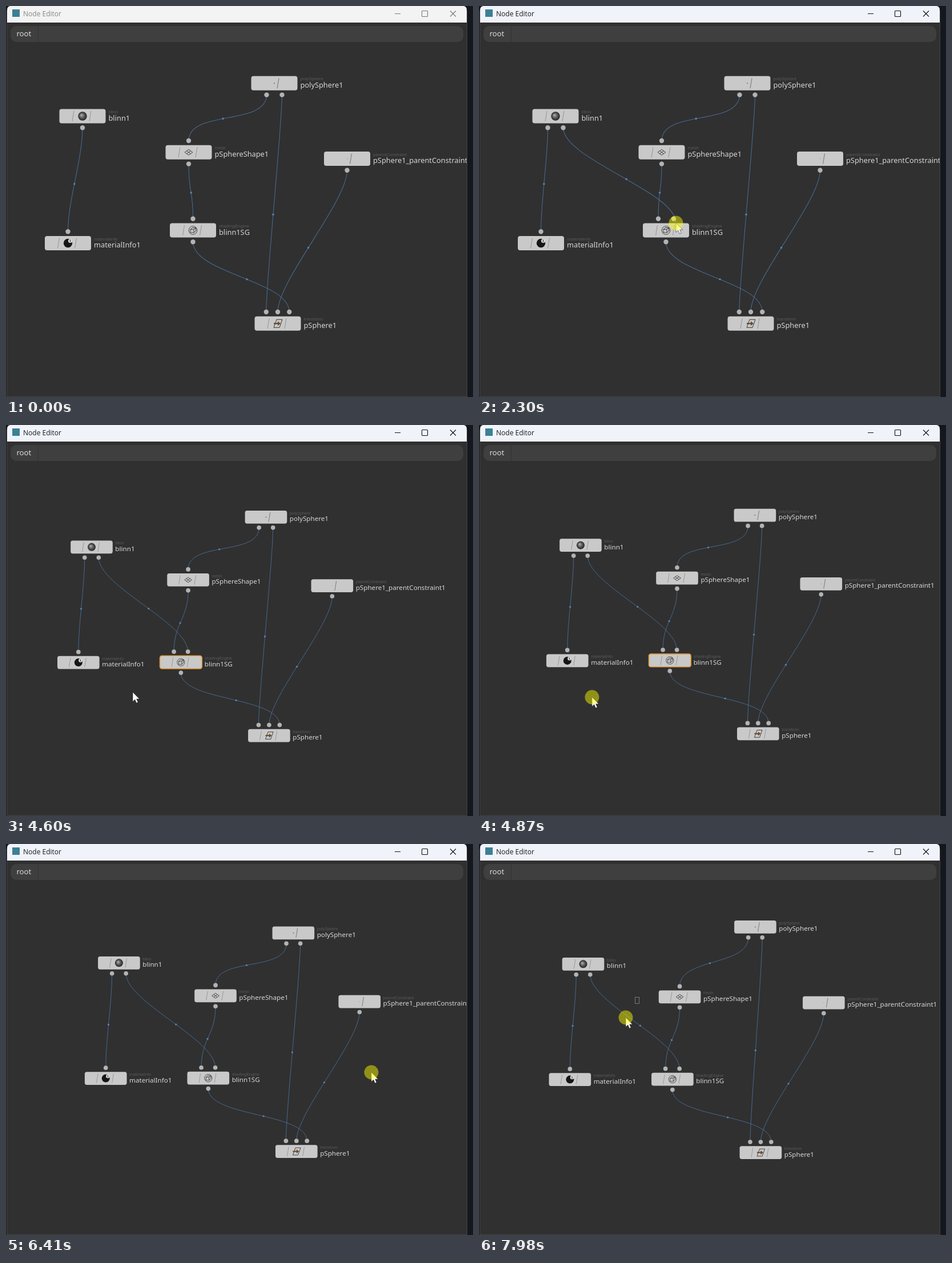
Write an HTML page with a canvas that moves like this. It is 818 by 685 pixels and loops after 8000 ms.

```html
<!DOCTYPE html>
<html>
<head>
<meta charset="utf-8">
<style>
html, body { margin: 0; width: 100%; height: 100%; overflow: hidden; background: #15171e; }
canvas { display: block; }
</style>
</head>
<body>
<canvas id="stage" width="818" height="685"></canvas>
<script>
const c = document.getElementById('stage').getContext('2d');
const LOOP = 8000, ZOOM = 0.909, LAG = 58, PORT = 20.3, PULL = 55;
const ORANGE = '#e39a35', BLUE = '#47698f';

const node = (name, type, x, y, ins, outs, icon) => ({ name, type, x0: x, y0: y, x, y, ins, outs, icon });
const poly = node('polySphere1', 'polySphere', 470, 135.3, 0, 2, slashIcon);
const blinn = node('blinn1', 'blinn', 134, 193, 0, 1, ballIcon);
const shape = node('pSphereShape1', 'mesh', 320, 256.3, 1, 1, meshIcon);
const cons = node('pSphere1_parentConstraint1', 'parentConstraint', 597.5, 267.5, 0, 1, slashIcon);
const sg = node('blinn1SG', 'shadingEngine', 327.5, 393, 1, 1, cubeIcon);
const info = node('materialInfo1', 'materialInfo', 108.5, 415.5, 1, 0, infoIcon);
const xform = node('pSphere1', 'transform', 476, 556.3, 3, 0, planeIcon);
const nodes = [poly, blinn, shape, cons, sg, info, xform];
const links = [
  [poly, 0, shape, 0], [poly, 1, xform, 0], [cons, 0, xform, 1], [sg, 0, xform, 2],
  [blinn, 0, info, 0], [shape, 0, sg, 0]
];

// Mouse stops: arrival time, x, y, rest
const stops = [
  [250, 458, 612, 0], [1200, 162, 215, 290], [2100, 345, 380, 700], [3100, 325, 500, 0],
  [3300, 322, 446, 70], [3550, 329.5, 403, 50], [4060, 310, 423, 300], [4600, 222, 468, 70],
  [4760, 170, 480, 0], [4960, 218, 474.5, 0], [5230, 89, 142, 0], [5580, 596, 463, 70],
  [5850, 725, 590, 200], [6400, 640, 400, 0], [6650, 624.5, 402, 0], [6960, 530, 238, 70],
  [7130, 492, 160, 0], [7320, 547, 175, 0], [7540, 488, 147.5, 0], [7780, 280, 268, 110],
  [7980, 257, 304, 20]
];
const drag = (what, from, to) => ({ what, from, to });
const drags = [
  drag('link', 1415, 2800), drag(sg, 3600, 4060), drag('pan', 4760, 4960), drag('area', 5230, 6040),
  drag('pan', 6400, 6650), drag(poly, 7130, 7540), drag('area', 7890, LOOP)
];

const within = (t, a, b) => t >= a && t < b;
const clamp = (v, a, b) => Math.max(a, Math.min(b, v));

function mouse(t) {
  const i = stops.findIndex(s => s[0] > t);
  if (i <= 0) return stops[i ? stops.length - 1 : 0].slice(1, 3);
  const [t0, x0, y0, rest] = stops[i - 1], [t1, x1, y1] = stops[i];
  let u = clamp((t - t0 - rest) / (t1 - t0 - rest), 0, 1);
  u *= u * (3 - 2 * u);
  return [x0 + (x1 - x0) * u, y0 + (y1 - y0) * u];
}

// Total distance something has been dragged by time t
function dragged(what, t) {
  let dx = 0, dy = 0;
  for (const d of drags.filter(d => d.what === what)) {
    const a = mouse(d.from), b = mouse(clamp(t, d.from, d.to));
    dx += b[0] - a[0];
    dy += b[1] - a[1];
  }
  return [dx, dy];
}

function path(points, close) {
  c.beginPath();
  points.forEach(([x, y]) => c.lineTo(x, y));
  if (close) c.closePath();
}
function stroke(color, width) {
  c.strokeStyle = color;
  c.lineWidth = width;
  c.stroke();
}
function line(color, width, ...points) {
  path(points);
  stroke(color, width);
}
function fill(color) {
  c.fillStyle = color;
  c.fill();
}
function disc(x, y, r, color) {
  c.beginPath();
  c.arc(x, y, r, 0, 7);
  fill(color);
}
function box(x, y, w, h, r, color) {
  c.beginPath();
  c.roundRect(x, y, w, h, r);
  fill(color);
}
function text(s, x, y, font, color) {
  c.font = font;
  c.fillStyle = color;
  c.fillText(s, x, y);
}

function dividers() {
  for (const x of [-15, 15]) line('#949494', 1, [x, -9], [x - 3, 9]);
}
function slashIcon(n) {
  line('#8a8a8a', 1.4, [8, -9], [5, 9]);
  disc(0, 0, 0.9, n === poly ? '#555' : '#aaa');
}
function ballIcon() {
  dividers();
  const g = c.createRadialGradient(-2, -2, 0.5, 0, 0, 7.7);
  g.addColorStop(0, '#aaa');
  g.addColorStop(0.5, '#5c5c5c');
  g.addColorStop(1, '#222');
  disc(0, 0, 7.7, g);
}
function meshIcon() {
  dividers();
  for (const i of [-1, 0, 1]) {
    for (const k of [-1, 1]) {
      line('#333', 0.9, [3.5 * (i - 1), 2.5 * k * (i + 1)], [3.5 * (i + 1), 2.5 * k * (i - 1)]);
    }
  }
}
function cubeIcon() {
  dividers();
  c.beginPath();
  c.arc(0, 0, 7.3, 0, 7);
  stroke('#444', 1);
  c.strokeRect(-4.5, -1.5, 6, 5.5);
  line('#333', 1, [-4.5, -1.5], [-1, -4.5], [5, -4.5], [1.5, -1.5]);
  line('#333', 1, [5, -4.5], [5, 1], [1.5, 4]);
}
function infoIcon() {
  dividers();
  disc(0, 0, 7.7, '#161616');
  disc(4, -4, 3.6, '#d8d8d8');
  line('#333', 1.2, [4, -6], [4, -2]);
}
function planeIcon() {
  dividers();
  path([[-2, -7], [8, -7], [3, 7], [-7, 7]], true);
  stroke('#333', 1);
  line('#6b4a2c', 2.4, [-7, 0], [1, 0]);
  path([[0, -4], [5, 0], [0, 4]], true);
  fill('#6b4a2c');
}

function port(n, count, i, side) {
  return [n.x + (i - (count - 1) / 2) * 81 / (count + 1), n.y + side * PORT];
}

function bezier(p, q, u) {
  const mix = (a, b, d, e) => {
    const v = 1 - u;
    return v * v * v * a + 3 * v * v * u * b + 3 * v * u * u * d + u * u * u * e;
  };
  return [mix(p[0], p[0], q[0], q[0]), mix(p[1], p[1] + PULL, q[1] - PULL, q[1])];
}

function drawLink(p, q, hit) {
  let hot = false;
  for (let u = 0; u <= 1; u += 0.05) hot = hot || hit(...bezier(p, q, u));
  c.beginPath();
  c.moveTo(...p);
  c.bezierCurveTo(p[0], p[1] + PULL, q[0], q[1] - PULL, ...q);
  stroke(hot ? ORANGE : BLUE, 1.1);
  disc(...bezier(p, q, 0.54), 1.8, hot ? ORANGE : '#5583b4');
}

function drawNode(n, selected) {
  box(n.x - 40.5, n.y - 12.5, 81, 25, 4, '#c9c9c9');
  if (selected) stroke(ORANGE, 1.8);
  c.save();
  c.translate(n.x, n.y);
  n.icon(n);
  c.restore();
  for (let i = 0; i < n.ins; i++) disc(...port(n, n.ins, i, -1), 4.2, '#b3b3b3');
  for (let i = 0; i < n.outs; i++) disc(...port(n, n.outs, i, 1), 4.2, '#b3b3b3');
  text(n.type, n.x + 45.5, n.y - 5, '8px "Liberation Sans", sans-serif', '#585858');
  text(n.name, n.x + 45.5, n.y + 7.8, '12.8px "Noto Sans", sans-serif', '#d6d6d6');
}

function drawWindow(t) {
  const active = t >= 1415, ink = active ? '#111' : '#777';
  box(0, 0, 818, 685, 0, '#15171e');
  box(1, 8, 807, 677, 0, '#444');
  box(2, 0, 805, 684, [6, 6, 0, 0], '#303030');
  box(2, 0, 805, 29, [6, 6, 0, 0], t >= 1490 ? '#f0f3fa' : '#f3f3f3');
  box(11, 6, 13, 13, 0, '#3b8094');
  text('Node Editor', 30, 18, '12px "Open Sans", sans-serif', active ? '#1a1a1a' : '#858585');
  line(ink, 1, [681, 13.5], [691, 13.5]);
  c.beginPath();
  c.roundRect(728.5, 8.5, 10, 10, 1);
  stroke(ink, 1.1);
  line(ink, 1.1, [778, 8.5], [788, 18.5]);
  line(ink, 1.1, [788, 8.5], [778, 18.5]);
  box(8, 35, 793, 28, 10, '#3f3f3f');
  box(56, 35, 1, 28, 0, '#333');
  text('root', 18.5, 53, '13.2px "Open Sans", sans-serif', '#e8e8e8');
}

function drawCursor(x, y, pressed) {
  c.save();
  c.translate(x, y);
  path([[0, 0], [0, 16.5], [3.8, 13], [6.4, 19], [9.2, 17.8], [6.7, 12], [11.8, 12]], true);
  fill('#fff');
  stroke('#222', 0.6);
  if (pressed) disc(0, 0, 12.5, 'rgba(255,255,0,.47)');
  c.restore();
}

function draw(t) {
  const zoomed = t >= 4185, s = zoomed ? ZOOM : 1;
  const [px, py] = dragged('pan', t);
  const ox = zoomed ? 28.2 + px : 0, oy = zoomed ? 38.4 + py : 0;
  const now = drags.find(d => within(t, d.from, d.to));
  for (const n of [sg, poly]) {
    const [dx, dy] = dragged(n, t);
    n.x = n.x0 + dx / s;
    n.y = n.y0 + dy / s;
  }
  blinn.outs = t >= 1090 ? 2 : 1;
  sg.ins = t >= 2300 ? 2 : 1;

  // Selection rectangle: left, top, right, bottom on the stage
  let area = null;
  if (now && now.what === 'area') {
    const [ax, ay] = mouse(now.from), [bx, by] = mouse(Math.max(now.from, t - LAG));
    area = [Math.min(ax, bx), Math.min(ay, by), Math.max(ax, bx), Math.max(ay, by)];
  }
  const hit = (x, y, w = 0, h = 0) => area !== null &&
    (x + w) * s + ox > area[0] && (x - w) * s + ox < area[2] &&
    (y + h) * s + oy > area[1] && (y - h) * s + oy < area[3];
  const selected = n => hit(n.x, n.y, 40.5, 12.5) || within(t, 6040, 6300) ||
    n === sg && within(t, 3600, 5230) || n === poly && within(t, 7130, 7890);

  drawWindow(t);
  c.save();
  c.beginPath();
  c.rect(2, 64, 805, 620);
  c.clip();
  c.save();
  c.transform(s, 0, 0, s, ox, oy);
  if (within(t, 1090, 1490)) {
    c.beginPath();
    c.roundRect(99, 207.5, 71, 12, 6);
    stroke('#5a5a5a', 1);
  }
  for (const [a, i, b, j] of links) drawLink(port(a, a.outs, i, 1), port(b, b.ins, j, -1), hit);
  if (t >= 1490) drawLink(port(blinn, 2, 1, 1), t < 2800 ? mouse(t) : port(sg, 2, 1, -1), hit);
  nodes.forEach(n => drawNode(n, selected(n)));
  c.restore();
  if (area) {
    const [l, top, r, b] = area.map(Math.round);
    c.setLineDash([1, 1]);
    c.strokeStyle = '#c4c4c4';
    c.lineWidth = 1;
    c.strokeRect(l + 0.5, top + 0.5, r - l, b - top);
    c.setLineDash([]);
  }
  if (t >= 255) drawCursor(...mouse(t), now);
  c.restore();
}

const start = performance.now();
function tick() {
  draw((performance.now() - start) % LOOP);
  requestAnimationFrame(tick);
}
tick();
</script>
</body>
</html>
```
